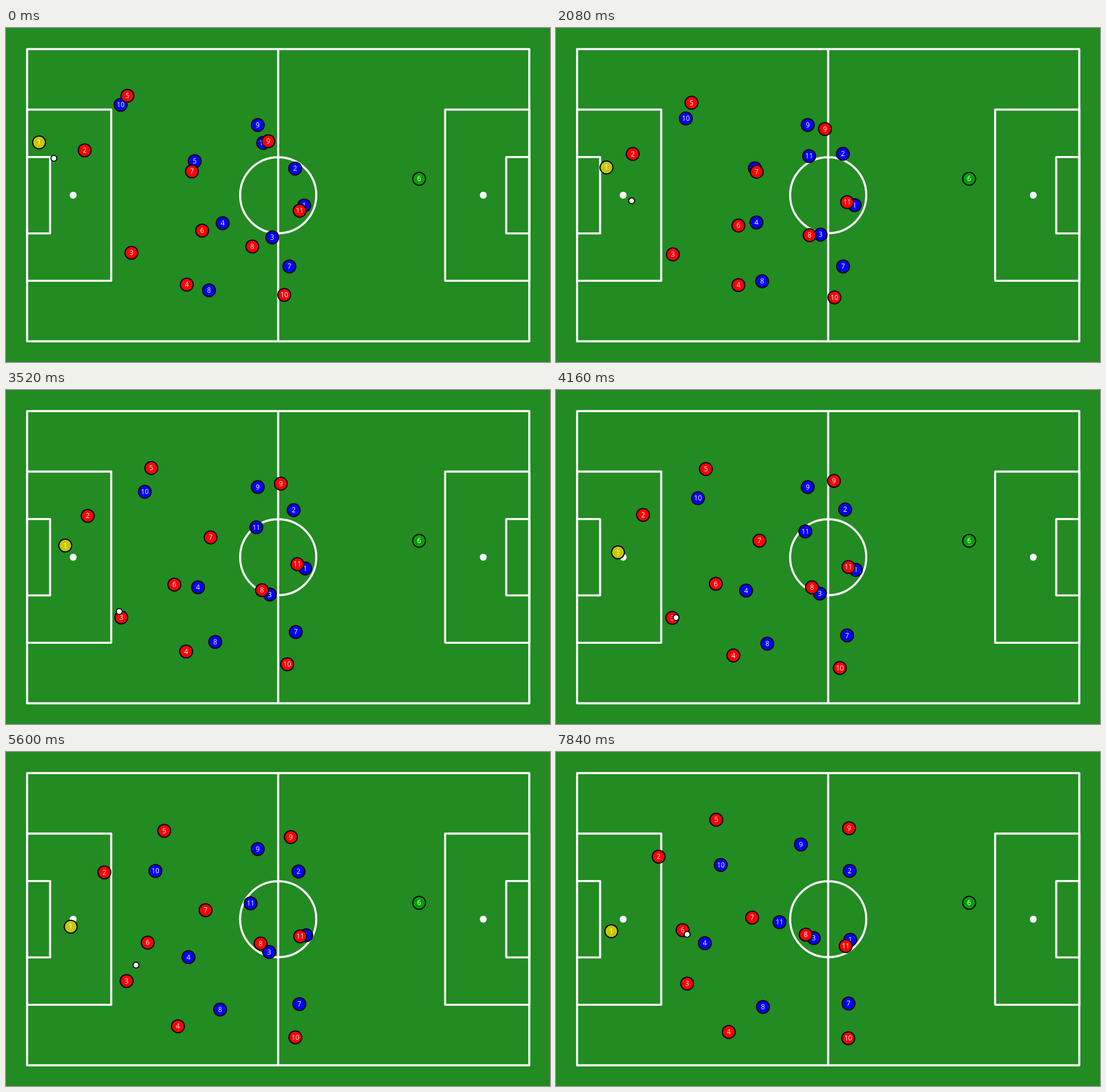
These frames come from a looping animation (954 by 587 pixels, 8 s). An HTML page with a canvas:

```html
<!DOCTYPE html>
<html lang="en">
<head>
<meta charset="utf-8">
<title>Match tracking</title>
<style>
  html, body { margin: 0; width: 100%; height: 100%; overflow: hidden; background: #228b22; }
  canvas { display: block; }
</style>
</head>
<body>
<canvas id="pitch" width="954" height="587"></canvas>
<script>
const LOOP = 8000, STEP = 160;
const KEY_TIMES = [0, 2880, 5600, 7840];
const RED = '#ff0000', BLUE = '#0000ff', YELLOW = '#c8c800', GREEN = '#00a000';
const ctx = document.getElementById('pitch').getContext('2d');
const players = [];

const clamp = (v, lo, hi) => Math.min(hi, Math.max(lo, v));

// Smooth run through a few key points; holds still outside their times.
function run(points, times = KEY_TIMES) {
  const last = points.length - 1;
  const speed = (k, axis) => {
    const a = Math.max(k - 1, 0), b = Math.min(k + 1, last);
    return (points[b][axis] - points[a][axis]) / (times[b] - times[a]);
  };
  return time => {
    if (last === 0) return points[0];
    const t = clamp(time, times[0], times[last]);
    let i = 0;
    while (i < last - 1 && t >= times[i + 1]) i++;
    const span = times[i + 1] - times[i], u = (t - times[i]) / span, v = 1 - u;
    return [0, 1].map(axis =>
      points[i][axis] * (1 + 2 * u) * v * v + points[i + 1][axis] * (1 + 2 * v) * u * u
      + span * u * v * (speed(i, axis) * v - speed(i + 1, axis) * u));
  };
}

function player(color, label, points, times, gone = LOOP) {
  players.push({ color, label, at: run(points, times), gone });
}

player(GREEN, 6, [[724.5, 265]]);
player(BLUE, 1, [[523, 312], [524, 312], [526.5, 322], [516, 330]]);
player(BLUE, 2, [[507, 247], [503, 214], [513, 210], [515, 209]]);
player(BLUE, 3, [[467, 368], [463, 361], [461.5, 351.5], [452, 327]]);
player(BLUE, 4, [[380, 343], [342, 343], [320, 360.5], [261, 336]]);
player(BLUE, 5, [[331, 234], [342, 239], [350, 248]], [0, 1280, 2240], 2240);
player(BLUE, 7, [[497, 419], [506, 421], [514.5, 443], [513, 442]]);
player(BLUE, 8, [[356, 461], [364, 442], [375.5, 452.5], [363, 448]]);
player(BLUE, 9, [[441.5, 170.5], [429.5, 162.5]], [6720, 7840]);
player(BLUE, 10, [[201, 135], [237, 169], [262, 209], [289, 198.5]]);
player(BLUE, 11, [[451, 202], [441, 234], [429, 266], [392, 299]]);
player(YELLOW, 1, [[58, 201], [98, 261], [113.5, 307], [97, 315]]);
player(RED, 2, [[138, 215], [137, 222], [172.5, 211.5], [180, 184]]);
player(RED, 3, [[220, 395], [202, 399], [211.5, 402.5], [230, 407]]);
player(RED, 4, [[317, 451], [319, 454.5], [301.5, 482], [303, 492]]);
player(RED, 5, [[213, 119], [247, 135], [277.5, 138.5], [281, 119]]);
player(RED, 6, [[344, 356], [308, 344], [248.5, 335], [222, 313]]);
player(RED, 7, [[326, 252], [358, 255], [350, 278], [344, 291]]);
player(RED, 8, [[432, 384], [448, 357], [446.5, 336.5], [438, 321]]);
player(RED, 9, [[460, 199], [477, 170], [499.5, 149.5], [514, 134]]);
player(RED, 10, [[488, 469], [490, 477], [507.5, 501.5], [512.5, 503]]);
player(RED, 11, [[515, 321], [510, 304], [516, 324], [508, 341]]);

// Keeper to number 3, then on to number 6.
const ballAt = run([[84, 229], [90, 247], [179, 363], [210.5, 400], [228, 374.5], [230, 320.5]],
  [0, 1280, 2880, 4160, 5600, 7840]);

function disc(x, y, r, color) {
  ctx.fillStyle = color;
  ctx.beginPath();
  ctx.arc(x, y, r, 0, 2 * Math.PI);
  ctx.fill();
}

// The field is 1200 by 700 units inside a margin of 50.
function drawPitch() {
  ctx.fillStyle = '#228b22';
  ctx.fillRect(0, 0, 954, 587);
  ctx.save();
  ctx.scale(954 / 1300, 587 / 800);
  ctx.translate(50.5, 50.5);
  ctx.strokeStyle = '#fff';
  ctx.lineWidth = 5;
  ctx.lineJoin = 'round';
  ctx.strokeRect(0, 0, 1200, 700);
  for (const [depth, width] of [[201, 410], [55, 183]]) {
    ctx.strokeRect(0, 350 - width / 2, depth, width);
    ctx.strokeRect(1200 - depth, 350 - width / 2, depth, width);
  }
  ctx.beginPath();
  ctx.moveTo(600, 0);
  ctx.lineTo(600, 700);
  ctx.moveTo(691, 350);
  ctx.arc(600, 350, 91, 0, 2 * Math.PI);
  ctx.stroke();
  for (const x of [110, 1090]) disc(x, 350, 8.3, '#fff');
  ctx.restore();
}

function drawPlayer({ color, label, at }, t) {
  const [x, y] = at(t);
  disc(x, y, 12.3, '#000');
  disc(x, y, 10.3, color);
  ctx.fillStyle = '#fff';
  ctx.fillText(label, x, y + 4.3);
}

function render(now) {
  const t = Math.floor((now % LOOP) / STEP) * STEP;
  drawPitch();
  ctx.font = '12px "Open Sans", sans-serif';
  ctx.textAlign = 'center';
  players.filter(p => t < p.gone).forEach(p => drawPlayer(p, t));
  const [x, y] = ballAt(t);
  disc(x, y, 6.1, '#000');
  disc(x, y, 4.3, '#fff');
}

let start = null;
function tick(now) {
  if (start === null) start = now;
  render(now - start);
  requestAnimationFrame(tick);
}
render(0);
requestAnimationFrame(tick);
</script>
</body>
</html>
```
